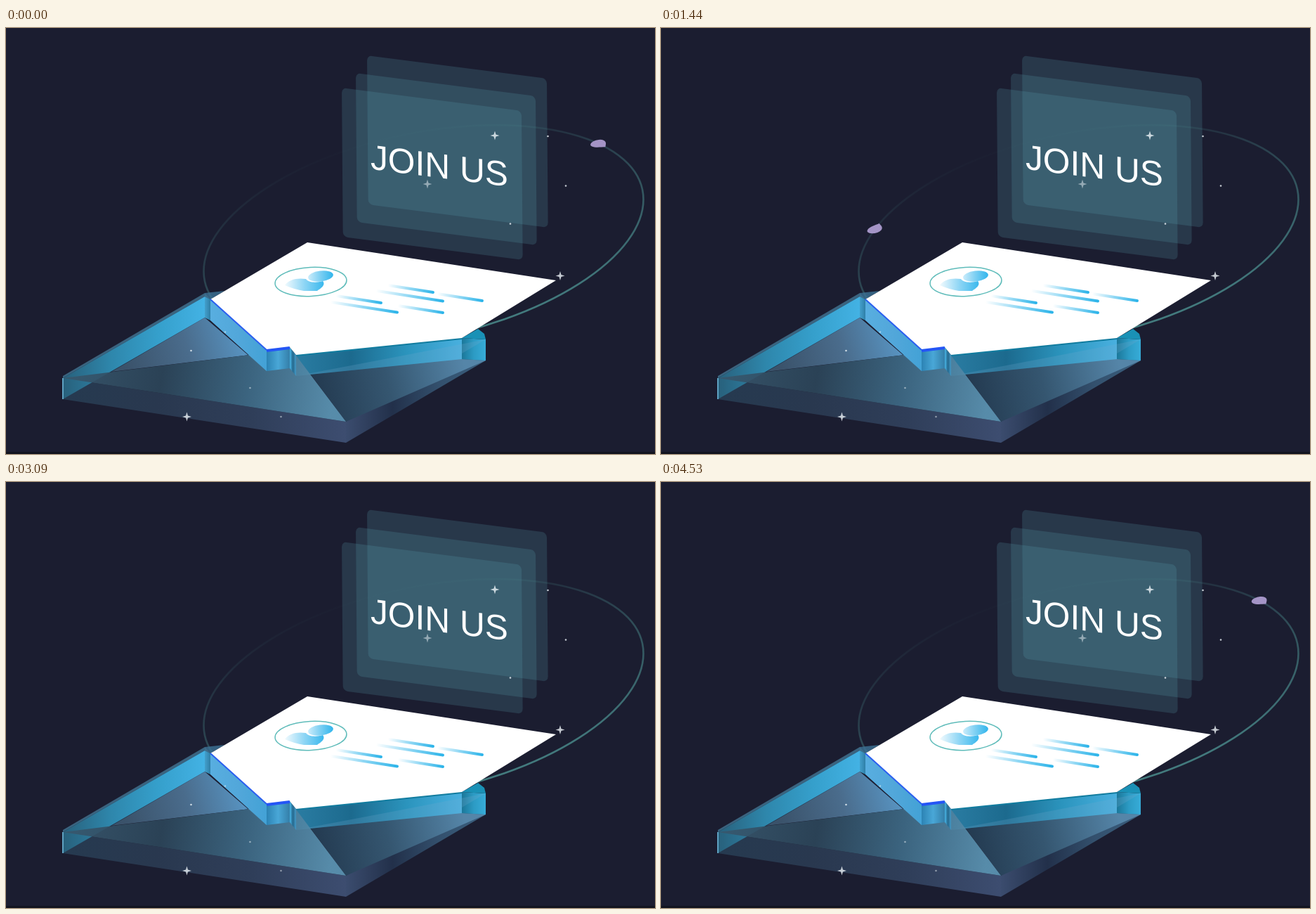
An HTML page with a canvas that plays this animation: 924x606 px, repeating every 4.56 s.

```html
<!DOCTYPE html>
<html lang="en">
<head>
<meta charset="utf-8">
<title>Join us</title>
<style>
  html, body { margin: 0; width: 100%; height: 100%; overflow: hidden; background: #1b1d30; }
  canvas { display: block; }
</style>
</head>
<body>
<canvas id="stage" width="924" height="606"></canvas>
<script>
const ctx = document.getElementById('stage').getContext('2d');
const LOOP = 4560;
const TAU = 2 * Math.PI;
const DEPTH = 30;

// A circle seen at a slant.
const orbit = { x: 594.5, y: 295, r: 313, shear: -0.163, squash: 0.474 };

// Corners of the envelope and the card.
const corner = {
  left: [81, 498], apex: [283, 382], rim: [291, 386],
  dipLeft: [371, 458], dipRight: [404, 454], mouth: [413, 465],
  hinge: [649, 441], right: [683, 443], front: [484, 560],
  cardTop: [429, 305], cardRight: [783, 359]
};

const below = ([x, y], d = DEPTH) => [x, y + d];

function gradient([x0, y0], [x1, y1], ...colors) {
  const g = ctx.createLinearGradient(x0, y0, x1, y1);
  colors.forEach((c, i) => g.addColorStop(i / (colors.length - 1), c));
  return g;
}

function poly(points, fill) {
  ctx.beginPath();
  points.forEach(p => ctx.lineTo(...p));
  ctx.closePath();
  ctx.fillStyle = fill;
  ctx.fill();
}

function line(from, to, stroke, width, cap = 'butt') {
  ctx.beginPath();
  ctx.moveTo(...from);
  ctx.lineTo(...to);
  ctx.strokeStyle = stroke;
  ctx.lineWidth = width;
  ctx.lineCap = cap;
  ctx.stroke();
}

// Upright strip hanging from an edge, shaded along that edge.
function wall(a, b, ...colors) {
  poly([a, b, below(b), below(a)], gradient(a, [b[0], a[1]], ...colors));
}

function panel(x, y) {
  ctx.save();
  ctx.transform(1, 0.129, 0.008, 1, x, y);
  ctx.beginPath();
  ctx.roundRect(0, 0, 256, 212, 7);
  ctx.fillStyle = 'rgba(90,166,180,0.2)';
  ctx.fill();
  ctx.restore();
}

function sign() {
  panel(514, 39);
  panel(498, 64);
  panel(478, 85);
  ctx.save();
  ctx.transform(1, 0.128, 0, 1, 519, 200.5);
  ctx.font = '49.7px "Liberation Sans", Arial, sans-serif';
  ctx.fillStyle = '#fff';
  ctx.fillText('JOIN US', 0, 0);
  ctx.restore();
}

function inOrbit(draw) {
  ctx.save();
  ctx.transform(1, orbit.shear, 0, orbit.squash, orbit.x, orbit.y);
  ctx.beginPath();
  draw();
  ctx.restore();
}

function ring() {
  inOrbit(() => ctx.arc(0, 0, orbit.r, 0, TAU));
  ctx.strokeStyle = gradient([575, 140], [665, 430], 'rgba(74,140,140,0)', 'rgba(74,140,140,0.85)');
  ctx.lineWidth = 2.6;
  ctx.stroke();
}

function comet(t) {
  const p = t / LOOP;
  const degrees = 37.5 + 360 * p + 7.5 * Math.sin(TAU * p);
  inOrbit(() => {
    ctx.rotate(-degrees * TAU / 360);
    ctx.translate(orbit.r, 0);
    // Round head, tail trailing behind along the orbit.
    ctx.arc(0, 0, 10.5, Math.PI, TAU);
    ctx.bezierCurveTo(10.5, 8, 4, 13, 0, 18);
    ctx.bezierCurveTo(-4, 13, -10.5, 8, -10.5, 0);
    ctx.fillStyle = '#a494c6';
    ctx.fill();
  });
}

function envelope() {
  const { left, apex, rim, dipLeft, dipRight, mouth, hinge, right, front } = corner;
  const flapFold = [150, 489];
  const flapTop = [371, 462];

  // Outer sides and back rim.
  poly([apex, [283, 377], [311, 374], rim], 'rgba(60,115,150,0.8)');
  wall(front, right, '#3b4c6e', '#22304a', '#33506d', '#3a5f7e');
  wall(left, front, '#263a50', '#29384f', '#2f3e59', '#3d4d70');

  // Left side.
  poly([[81, 495], [283, 377], rim, apex, left], 'rgba(64,112,142,0.85)');
  wall(left, apex, '#28607b', '#2e86ab', '#359fcb', '#43b2e4');
  poly([flapFold, below(apex), below(dipLeft), flapTop],
    gradient([170, 490], [350, 440], '#3a526a', '#4a6c8c', '#5a9aca'));

  // Right side.
  poly([mouth, hinge, below(hinge), below(right), front],
    gradient([430, 510], [650, 465], '#22384e', '#355670', '#5585a8'));
  wall(mouth, hinge, '#2a7ca2', '#1c6a8e', '#2b94bd', '#49b0df');
  wall(hinge, right, '#1b7799', '#2c9bc4', '#37acd8');
  poly([right, below(hinge, 22), below(hinge), below(mouth), [560, 467]], 'rgba(118,170,205,0.22)');
  poly([right, hinge, [672, 428], [681, 435]], '#1a91b6');
  line(mouth, hinge, '#127c9f', 4);

  // Front flap, with the walls around its notch on top.
  ctx.globalAlpha = 0.92;
  poly([left, flapTop, dipRight, front],
    gradient([100, 480], [465, 530], '#37566c', '#2c4559', '#3e6a86', '#5c95b4'));
  ctx.globalAlpha = 1;
  wall(rim, dipLeft, '#58aee0', '#52a7da', '#43a2d6');
  wall(apex, rim, '#43a0cc', '#2f7fa8');
  wall(dipLeft, dipRight, '#2c83b4', '#49a7d7', '#347fa9');
  wall(dipRight, mouth, '#4ab7e8', '#25698e', '#4599c5');
  line(left, below(left), '#5fa2c2', 2);
}

function portrait() {
  ctx.beginPath();
  ctx.ellipse(434, 361, 51, 20.5, -0.05, 0, TAU);
  ctx.strokeStyle = '#5fbcba';
  ctx.lineWidth = 1.5;
  ctx.stroke();

  ctx.beginPath();
  ctx.moveTo(397, 366);
  ctx.bezierCurveTo(402, 358, 414, 355, 427, 357);
  ctx.bezierCurveTo(430, 362, 441, 363, 451, 360);
  ctx.bezierCurveTo(456, 366, 447, 371, 443, 374);
  ctx.lineTo(424, 374);
  ctx.quadraticCurveTo(411, 372, 397, 366);
  ctx.fillStyle = gradient([393, 0], [456, 0], '#fff', '#8fd6f5', '#2fb4ec');
  ctx.fill();

  ctx.beginPath();
  ctx.ellipse(448, 353, 18, 7.5, -0.12, 0, TAU);
  ctx.fillStyle = gradient([428, 0], [466, 0], '#d4f0fc', '#7fd0f3', '#30b5ec');
  ctx.fill();
}

function writing() {
  const ends = [[608, 376], [622, 388.5], [678, 388]];
  for (let block = 0; block < 2; block++) {
    ends.forEach(([x, y], i) => {
      const end = [x - block * (74 - 9 * i), y + block * (15 + i)];
      const length = i === 1 ? 95 : 64;
      const begin = [end[0] - length, end[1] - length * 0.155];
      line(begin, end, gradient(begin, end, '#fff', '#8ed7f4', '#2db4e9'), 4, 'round');
    });
  }
}

function card() {
  const { rim, dipLeft, dipRight, mouth, hinge, cardTop, cardRight } = corner;
  poly([cardTop, cardRight, hinge, mouth, dipRight, dipLeft, rim], '#fff');
  line(rim, dipLeft, '#2b5ff0', 2);
  line(below(dipLeft, 1), below(dipRight, 1), '#2455f5', 4);
  portrait();
  writing();
}

function sparkle([x, y]) {
  ctx.beginPath();
  for (let i = 0; i < 8; i++) {
    const r = i % 2 ? 2.1 : 6.5, a = i * TAU / 8;
    ctx.lineTo(x + r * Math.cos(a), y + r * Math.sin(a));
  }
  ctx.fill();
}

function dot([x, y]) {
  ctx.beginPath();
  ctx.arc(x, y, 1.3, 0, TAU);
  ctx.fill();
}

function stars() {
  ctx.fillStyle = 'rgba(240,246,250,0.8)';
  [[696, 153], [789, 352.5], [257.5, 553]].forEach(sparkle);
  [[771.5, 154], [797, 224.5], [718, 278.5], [263.5, 459]].forEach(dot);
  ctx.fillStyle = 'rgba(240,246,250,0.5)';
  sparkle([600, 222]);
  [[312, 432.5], [347.5, 512], [391.5, 553]].forEach(dot);
}

function render(t) {
  ctx.fillStyle = '#1b1d30';
  ctx.fillRect(0, 0, 924, 606);
  ctx.fillStyle = '#12141f';
  ctx.fillRect(0, 603, 924, 3);
  sign();
  ring();
  comet(t);
  envelope();
  card();
  stars();
}

const start = performance.now();
function tick() {
  render((performance.now() - start) % LOOP);
  requestAnimationFrame(tick);
}
tick();
</script>
</body>
</html>
```
